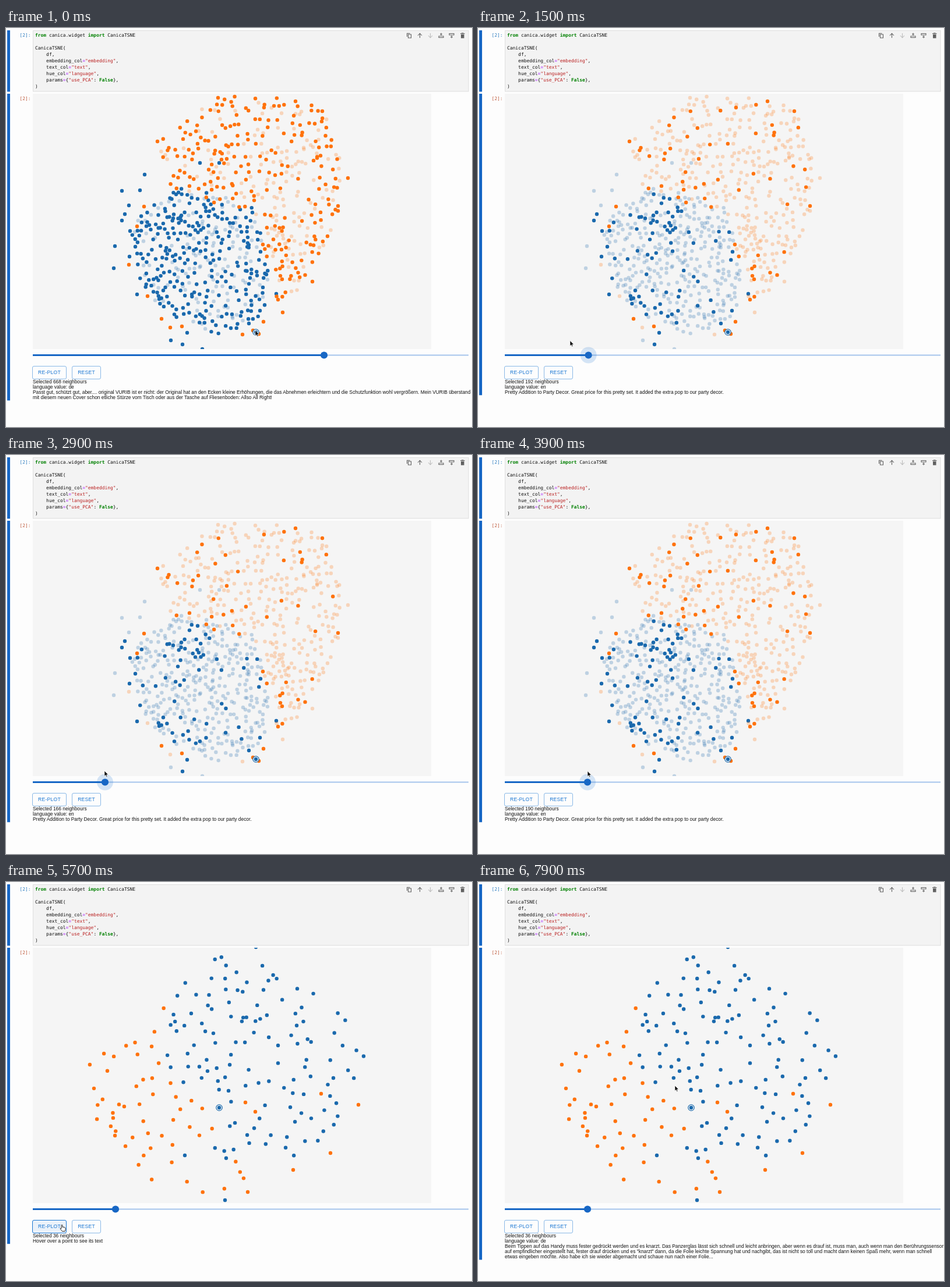
These frames come from a looping animation (800x686 px, 8000 ms). An HTML page with a canvas:

```html
<!DOCTYPE html>
<html lang="en">
<head>
<meta charset="utf-8">
<title>Notebook scatter plot</title>
<style>
html, body { margin: 0; width: 100%; height: 100%; overflow: hidden; background: #fdfdfd; }
body { position: relative; font: 8.4px/9.1px "Liberation Sans", Arial, sans-serif; color: #111; }
canvas, svg, pre, .prompt, .btn, #info { position: absolute; margin: 0; }
canvas, svg { left: 0; top: 0; }
pre, .prompt { font: 7.95px/11px "DejaVu Sans Mono", monospace; }
pre { left: 50px; top: 7px; color: #111; }
pre b { color: #008000; }
pre i { color: #ba2121; font-style: normal; }
pre u { color: #a2f; text-decoration: none; }
.prompt { left: 23.5px; }
.btn { box-sizing: border-box; top: 581px; height: 23px; border: 1px solid #1976d280; border-radius: 3px;
  color: #1976d2; font-size: 8.55px; line-height: 21px; letter-spacing: .02857em; text-align: center; }
#info { left: 46px; top: 604px; white-space: pre; }
</style>
</head>
<body>
<canvas id="stage" width="800" height="686"></canvas>
<div class="prompt" style="top:7px;color:#307fc1">[2]:</div>
<div class="prompt" style="top:116px;color:#bf5b3d">[2]:</div>
<pre><b>from</b> canica.widget <b>import</b> CanicaTSNE

CanicaTSNE(
    df,
    embedding_col<u>=</u><i>"embedding"</i>,
    text_col<u>=</u><i>"text"</i>,
    hue_col<u>=</u><i>"language"</i>,
    params<u>=</u>{<i>"use_PCA"</i>: <b>False</b>},
)</pre>
<div class="btn" id="replot" style="left:45px;width:59px">RE-PLOT</div>
<div class="btn" style="left:113px;width:50px">RESET</div>
<div id="info"></div>
<svg width="800" height="686">
  <path id="arrow" d="M0 0V9.2L2.1 7.3 3.5 10.4 5 9.8 3.6 6.8 6.4 6.6Z" stroke="#fff" stroke-width=".7"/>
  <path id="hand" d="M-1 1Q-1 0 0 0 1 0 1 1V4Q2 3 3 4 4.2 3.5 5 4.7 6 4.5 6 6V8Q6 9.5 5 11H.5Q-1 9-3 6.6-3 5.3-1 6.2Z" fill="#fff" stroke="#111" stroke-width=".9"/>
</svg>
<script>
const $ = id => document.getElementById(id);
const ctx = $('stage').getContext('2d');
const ORANGE = '#ff720c', BLUE = '#1a69ad', ACCENT = '#1767c5';
const LOOP = 8000, STEP = 100, REPLOT = 5200;

let seed = 7;
function random() {
  seed = (seed * 1664525 + 1013904223) >>> 0;
  return seed / 4294967296;
}

const pairs = a => a.flatMap((x, i) => i % 2 ? [] : [[x, a[i + 1]]]);
const dots = (list, color, rank) => pairs(list).map(([x, y]) => ({ x, y, color, rank }));

// Adds evenly spread random dots inside a polygon
function scatter(points, count, outline, color, rank) {
  const area = new Path2D('M' + outline.join(' ') + 'Z');
  const xs = pairs(outline).map(p => p[0]), ys = pairs(outline).map(p => p[1]);
  const left = Math.min(...xs), top = Math.min(...ys);
  const w = Math.max(...xs) - left, h = Math.max(...ys) - top;
  const pick = () => {
    for (;;) {
      const x = left + random() * w, y = top + random() * h;
      if (ctx.isPointInPath(area, x, y)) return { x, y };
    }
  };
  const gap = p => Math.min(...points.map(q => Math.hypot(p.x - q.x, p.y - q.y)));
  while (count--) {
    const a = pick(), b = pick();
    const p = gap(a) > gap(b) ? a : b;
    points.push({ ...p, color, rank: rank(p) });
  }
}

const bump = (p, x, y, sx, sy) => Math.exp(-(((p.x - x) / sx) ** 2 + ((p.y - y) / sy) ** 2) / 2);
const ranked = (near, far) => p => random() < near(p)
  ? random() * 190
  : 195 + 805 * Math.min(1, .75 * random() + .35 * far(p));

const full = [
  ...dots([303,544, 311,524, 199,331, 204,320, 213,349, 222,376, 212,393, 225,458, 464,457, 436,486, 417,508], BLUE, 100),
  ...dots([187,375, 185,413, 199,280, 230,279, 238,252, 211,305, 283,537, 337,552, 366,232, 333,232], BLUE, 300),
  ...dots([434,526, 424,520, 442,505, 267,500, 302,513, 467,467, 474,432, 225,341, 237,307, 260,195,
    570,306, 543,143, 497,126], ORANGE, 100),
  ...dots([211,407, 243,461, 282,515, 406,527, 475,489, 526,436, 587,258], ORANGE, 300)];
scatter(full, 385, [240,310, 290,272, 360,285, 430,310, 455,440, 442,490, 415,508, 365,530, 280,502, 228,430, 215,345],
  BLUE, ranked(p => .07 + .6 * bump(p, 313, 330, 20, 30) + .55 * bump(p, 306, 490, 35, 20) + .2 * bump(p, 230, 400, 20, 60),
    p => bump(p, 378, 385, 52, 70)));
scatter(full, 350, [325,142, 370,116, 500,116, 548,145, 585,258, 558,362, 500,455, 465,468, 430,330, 310,288, 262,260, 260,195],
  ORANGE, ranked(p => p.x < 400 ? .21 : .1, p => bump(p, 485, 270, 62, 87)));

const zoomed = [
  ...dots([429,112, 307,470, 376,547], BLUE, 0),
  ...dots([411,379, 428,395, 493,495, 557,466, 605,383, 541,364], ORANGE, 0)];
scatter(zoomed, 125, [290,150, 385,122, 440,122, 495,165, 545,195, 636,295, 580,358, 568,420, 492,487,
  410,455, 343,497, 385,380, 275,337, 275,295], BLUE, () => 0);
scatter(zoomed, 54, [275,206, 270,340, 337,366, 358,407, 379,450, 445,517, 438,538, 260,533, 192,470, 160,432,
  140,362, 141,315, 204,264], ORANGE, () => 0);

const cover = `language value: de
Passt gut, schützt gut, aber.... original VURIB ist er nicht: der Original hat an den Ecken kleine Erhöhungen, die das Abnehmen erleichtern und die Schutzfunktion wohl vergrößern. Mein VURIB überstand
mit diesem neuen Cover schon etliche Stürze vom Tisch oder aus der Tasche auf Fliesenboden: Allso All Right!`;
const party = `language value: en
Pretty Addition to Party Decor. Great price for this pretty set. It added the extra pop to our party decor.`;
const glass = `language value: de
Beim Tippen auf das Handy muss fester gedrückt werden und es knarzt. Das Panzerglas lässt sich schnell und leicht anbringen, aber wenn es drauf ist, muss man, auch wenn man den Berührungssensor
auf empfindlicher eingestellt hat, fester drauf drücken und es "knarzt" dann, da die Folie leichte Spannung hat und nachgibt, das ist nicht so toll und macht dann keinen Spaß mehr, wenn man schnell
etwas eingeben möchte. Also habe ich sie wieder abgemacht und schaue nun nach einer Folie...`;
const notes = [[0, cover], [1300, party], [REPLOT, 'Hover over a point to see its text'], [6600, cover], [7500, glass]];

const pointer = [[0, 428, 520], [100, 428, 520], [500, 546, 561], [800, 631, 562], [1500, 158, 537.5],
  [1700, 160, 538], [2000, 517, 559.5], [2300, 572, 560], [2900, 169, 543], [3300, 169, 543],
  [3900, 188, 543.5], [4600, 188, 544], [5000, 96, 589.5], [5700, 96, 589.5], [6300, 500, 420],
  [7400, 337, 366], [7900, 338, 350]];
const thumb = [[0, 546], [500, 546], [800, 631], [1500, 189.6], [1700, 189.6], [2000, 482], [2300, 572],
  [2900, 170], [3300, 170], [3900, 188]];
const handTimes = [[500, 1100], [1800, 2500], [4900, 5900]];
const during = (t, spans) => spans.some(([a, b]) => t >= a && t < b);

function at(keys, t) {
  const i = keys.findIndex(k => k[0] > t);
  if (i < 0) return keys[keys.length - 1].slice(1);
  const a = keys[i - 1], b = keys[i];
  const k = (t - a[0]) / (b[0] - a[0]), e = k * k * (3 - 2 * k);
  return a.slice(1).map((v, j) => v + (b[j + 1] - v) * e);
}

function box(x, y, w, h, color) {
  ctx.fillStyle = color;
  ctx.fillRect(x, y, w, h);
}

function disc(x, y, r, color) {
  ctx.fillStyle = color;
  ctx.beginPath();
  ctx.arc(x, y, r, 0, 7);
  ctx.fill();
}

function line(d, color = '#616161') {
  ctx.strokeStyle = color;
  ctx.lineWidth = 1.1;
  ctx.stroke(new Path2D(d));
}

function toolbar() {
  line('M688.5 15V9.2H693.5M690.5 11H695.5V17H690.5Z');
  line('M710.5 17V9.5M707 13L710.5 9.2 714 13');
  line('M728.5 9V16.5M725 13L728.5 16.8 732 13', '#bbb');
  line('M743 14H751V16.5H743ZM747 13V8.5M745 10.5H749');
  line('M761 9.5H769V12H761ZM765 13V17.5M763 15.5H767');
  box(781, 11, 5.5, 6.5, '#616161');
  box(780, 9, 7.5, 1.2, '#616161');
  box(782, 8.3, 3.5, 1, '#616161');
}

function plot(points, limit, [sx, sy]) {
  box(46, 113, 684, 439, '#f5f5f5');
  ctx.save();
  ctx.beginPath();
  ctx.rect(46, 113, 684, 439);
  ctx.clip();
  for (const p of points) {
    ctx.globalAlpha = p.rank < limit ? 1 : .25;
    disc(p.x, p.y, 3.2, p.color);
  }
  ctx.globalAlpha = 1;
  disc(sx, sy, 5.8, BLUE);
  disc(sx, sy, 4.6, '#f5f5f5');
  disc(sx, sy, 3.2, BLUE);
  ctx.restore();
}

function slider(x, halo) {
  box(46, 561.5, 748, 2, '#a5c4ec');
  box(46, 561, x - 46, 3, ACCENT);
  if (halo) disc(x, 562.5, 14, 'rgba(25,118,210,.18)');
  disc(x, 562.5, 6.1, ACCENT);
}

function draw(t) {
  const done = t >= REPLOT, [x] = at(thumb, t);
  const chosen = Math.round((x - 46) / 748 * 1000);
  const note = notes.filter(n => n[0] <= t).pop()[1];
  const text = `Selected ${done ? 36 : chosen} neighbours\n${note}`;
  $('info').textContent = text;

  box(0, 0, 800, 686, '#fdfdfd');
  box(2, 4, 5, 105.5, ACCENT);
  box(2, 113, 5, 491 + 9.1 * text.split('\n').length, ACCENT);
  box(46, 4, 748.5, 105.5, '#dedede');
  box(47, 5, 746.5, 103.5, '#f3f3f3');
  toolbar();
  plot(done ? zoomed : full, done ? 1 : chosen, done ? [366, 388] : [429, 523]);
  slider(x, t >= 500 && t < 4600);

  const over = t >= 4900 && t < 5900, pressed = t >= REPLOT && t < 5500;
  $('replot').style.background = pressed ? '#1976d238' : over ? '#1976d214' : 'none';
  $('replot').style.borderColor = over ? '#1976d2' : '';

  const hand = during(t, handTimes), [px, py] = at(pointer, t);
  for (const id of ['arrow', 'hand']) {
    $(id).style.display = (id === 'hand') === hand ? '' : 'none';
    $(id).setAttribute('transform', `translate(${px} ${py})`);
  }
}

let start, last = -1;
function tick(now) {
  start ??= now;
  const t = Math.floor((now - start) % LOOP / STEP) * STEP;
  if (t !== last) draw(last = t);
  requestAnimationFrame(tick);
}
draw(0);
requestAnimationFrame(tick);
</script>
</body>
</html>
```
